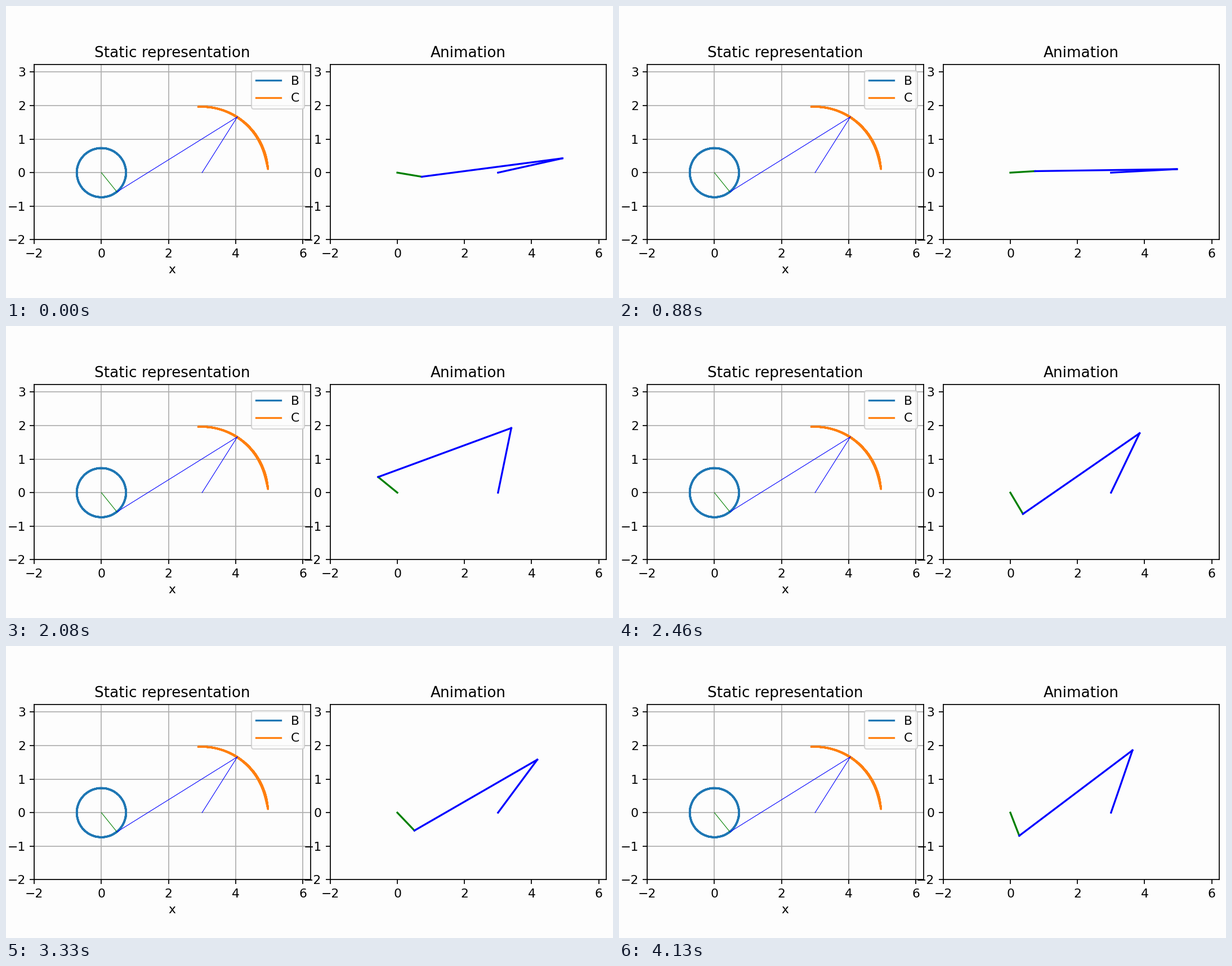
These frames come from a looping animation (1078x519 px, 4180 ms). A matplotlib script:

```python
import numpy as np
import matplotlib.pyplot as plt
from matplotlib.animation import FuncAnimation

W, H, DPI = 1078, 519, 157.5
FRAMES, LOOP_MS = 100, 4180
PAPER = "#fdfdfd"

# Four-bar linkage: crank OB, coupler BC, rocker CD
CRANK, COUPLER, ROCKER, BASE = 0.738, 4.227, 1.966, 3.0
START, STEP = -0.166, 0.31  # crank angle in radians, per frame
UNIT = 59.6  # pixels per length unit

plt.rcParams["font.family"] = "DejaVu Sans"


def solve(theta):
    """Return joints B and C for the crank angle(s), elbow up."""
    b = CRANK * np.array([np.cos(theta), np.sin(theta)])
    dx, dy = BASE - b[0], -b[1]
    dist = np.hypot(dx, dy)
    cos_in = (COUPLER**2 + dist**2 - ROCKER**2) / (2 * COUPLER * dist)
    angle = np.arctan2(dy, dx) + np.arccos(np.clip(cos_in, -1, 1))
    c = b + COUPLER * np.array([np.cos(angle), np.sin(angle)])
    return b, c


def bars(b, c):
    o, d = (0, 0), (BASE, 0)
    return [np.transpose(pair) for pair in ((o, b), (b, c), (c, d))]


def make_axes(left, title):
    xlim, ylim = (-2, COUPLER + 2), (-2, COUPLER - 1)
    width, height = UNIT * np.ptp(xlim), UNIT * np.ptp(ylim)
    bottom = H - 415.4
    ax = fig.add_axes([left / W, bottom / H, width / W, height / H],
                      facecolor=PAPER)
    ax.set(xlim=xlim, ylim=ylim, title=title,
           xticks=range(-2, 7, 2), yticks=range(-2, 4))
    return ax


def draw_bars(ax, b, c, lw):
    return [ax.plot(*bar, color=color, lw=lw)[0]
            for bar, color in zip(bars(b, c), ("g", "b", "b"))]


fig = plt.figure(figsize=((W + 0.01) / DPI, (H + 0.01) / DPI), dpi=DPI,
                 facecolor=PAPER)
B, C = solve(START + STEP * np.arange(FRAMES))

static = make_axes(50.2, "Static representation")
static.grid(True)
static.set_xlabel("x")
static.plot(*B, label="B")
static.plot(*C, label="C")
draw_bars(static, B[:, -1], C[:, -1], 0.5)
static.legend(loc="upper right", facecolor=PAPER)

moving = make_axes(575.8, "Animation")
links = draw_bars(moving, B[:, 0], C[:, 0], 1.5)


def update(i):
    for link, bar in zip(links, bars(B[:, i], C[:, i])):
        link.set_data(*bar)
    return links


anim = FuncAnimation(fig, update, frames=FRAMES, interval=LOOP_MS / FRAMES,
                     repeat=True, repeat_delay=0, blit=False)
plt.show()
```
